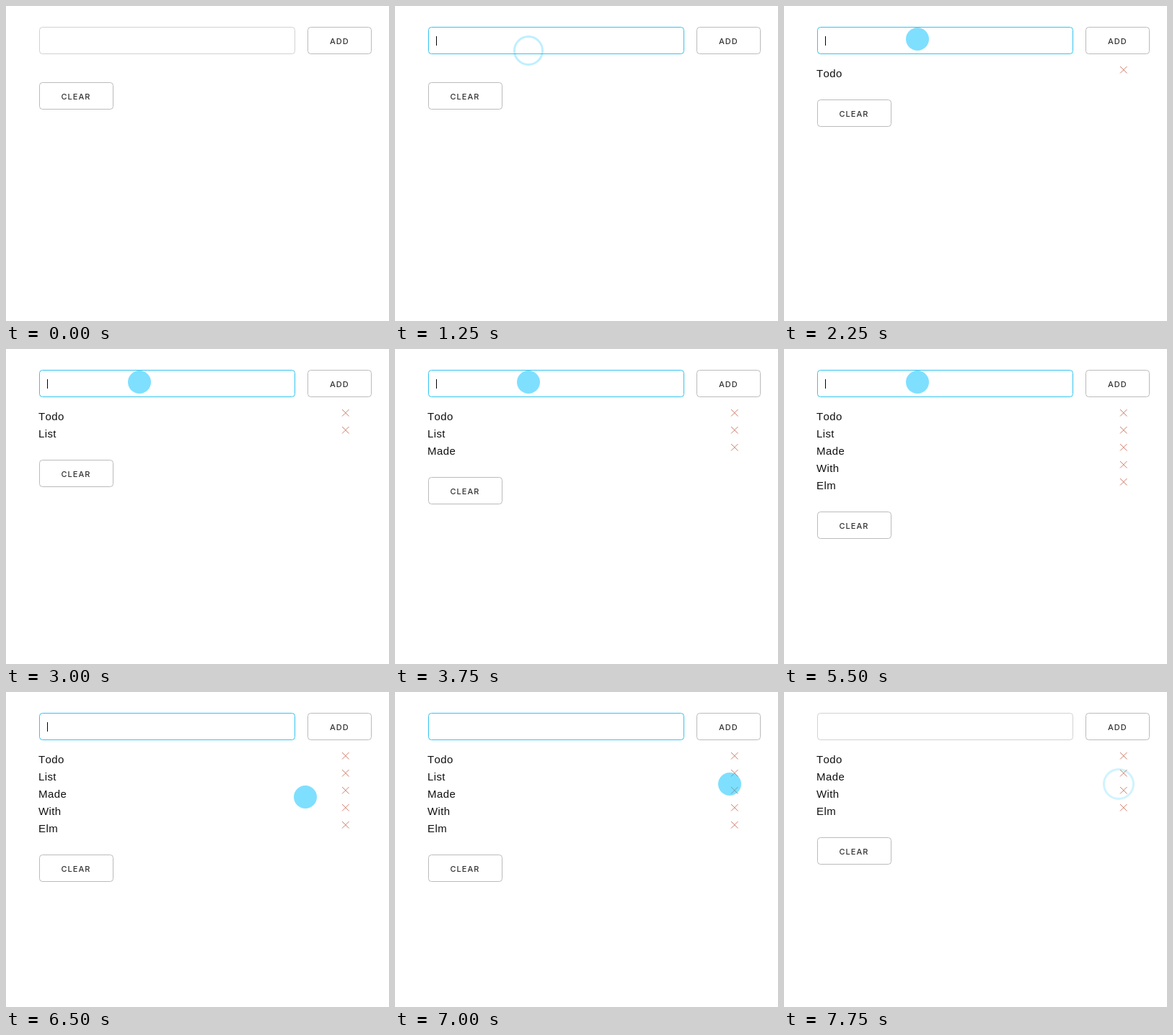
An HTML page for the animation above (8 s loop, 531 px wide and 438 px high).

```html
<!DOCTYPE html>
<html lang="en">
<head>
<meta charset="utf-8">
<title>Todo list</title>
<style>
  html, body { margin: 0; width: 100%; height: 100%; overflow: hidden; background: #fff; }
  svg { display: block; width: 531px; height: 438px; }
  .box { fill: #fff; stroke: #bbb; }
  .label { font: 500 11px Inter, sans-serif; letter-spacing: 1px; fill: #333; }
  .item { font: 15px "Liberation Sans", Arial, sans-serif; letter-spacing: .4px; font-kerning: none; fill: #111; }
  .cross { stroke: #cf7f6c; fill: none; }
</style>
</head>
<body>
<svg viewBox="0 0 531 438">
  <rect id="field" class="box" x="46.5" y="29.5" width="354" height="37" rx="4"/>
  <text id="typed" class="item" x="57" y="53"></text>
  <rect id="caret" y="42" width="1" height="13"/>
  <rect class="box" x="418.5" y="29.5" width="88" height="37" rx="4"/>
  <text class="label" x="449" y="53">ADD</text>
  <g id="list"></g>
  <g id="clear">
    <rect class="box" x="46.5" y="106.5" width="102" height="37" rx="4"/>
    <text class="label" x="76.5" y="130">CLEAR</text>
  </g>
  <circle id="dot" r="16" fill="#00c0ff" fill-opacity=".5"/>
  <circle id="ring" fill="none" stroke="#00c0ff" stroke-width="3"/>
</svg>
<script>
const LOOP = 8000, STEP = 250, ROW = 24;
const $ = id => document.getElementById(id);
const set = (el, attrs) => { for (const k in attrs) el.setAttribute(k, attrs[k]); };
const show = (el, on) => { el.style.display = on ? '' : 'none'; };

// [time, text in the field]; an empty text means it was just submitted
const typing = [
  [0, ''], [1500, 'To'], [1750, 'Todo'], [2000, ''],
  [2500, 'Li'], [2750, 'List'], [3000, ''],
  [3250, 'Ma'], [3500, 'Made'], [3750, ''],
  [4000, 'Wi'], [4250, 'With'], [4500, ''],
  [5000, 'El'], [5250, 'Elm'], [5500, '']
];
const items = [['Todo', 2000], ['List', 3000, 7500], ['Made', 3750], ['With', 4500], ['Elm', 5500]];

// [time, x, y] of the pointer
const path = [
  [750, 185, 72], [1000, 185, 62], [2000, 185, 54], [2250, 185, 46],
  [6000, 341, 169], [6500, 415, 146], [6750, 445, 135], [7000, 464, 128]
];
// [time, radius, opacity] of the click ripple
const ripple = [
  [1000, 16, .5], [1250, 19.5, .25], [1500, 0, 0],
  [7500, 16, .5], [7750, 20.5, .19]
];
const focusOn = 1000, focusOff = 7500;
const blinks = [[6000, 6500], [7000, 7500]];

const at = (track, t) => track.filter(k => k[0] <= t).pop();

const rows = items.map(([name, from, to = LOOP]) => {
  const g = document.createElementNS('http://www.w3.org/2000/svg', 'g');
  g.innerHTML = `<text class="item" x="45" y="99">${name}</text>
    <path class="cross" d="M466 84l9.5 9.5m0-9.5l-9.5 9.5"/>`;
  $('list').append(g);
  return { g, from, to };
});

function render(t) {
  t = Math.floor(t / STEP) * STEP;

  const focused = t >= focusOn && t < focusOff;
  $('field').style.stroke = focused ? '#33c3f0' : '#d1d1d1';
  const text = at(typing, t)[1];
  $('typed').textContent = text;
  const width = text ? $('typed').getComputedTextLength() : 0;
  set($('caret'), { x: Math.round(57 + width) });
  show($('caret'), focused && !blinks.some(([a, b]) => t >= a && t < b));

  let n = 0;
  for (const { g, from, to } of rows) {
    const on = t >= from && t < to;
    show(g, on);
    if (on) set(g, { transform: `translate(0 ${ROW * n++})` });
  }
  set($('clear'), { transform: `translate(0 ${ROW * n})` });

  const pos = at(path, t), wave = at(ripple, t);
  const rippling = !!wave && wave[1] > 0;
  show($('ring'), rippling);
  show($('dot'), !!pos && !rippling);
  if (pos) set($('dot'), { cx: pos[1], cy: pos[2] });
  if (rippling) set($('ring'), { cx: pos[1], cy: pos[2], r: wave[1], 'stroke-opacity': wave[2] });
}

const start = performance.now();
function frame() {
  render((performance.now() - start) % LOOP);
  requestAnimationFrame(frame);
}
frame();
</script>
</body>
</html>
```
